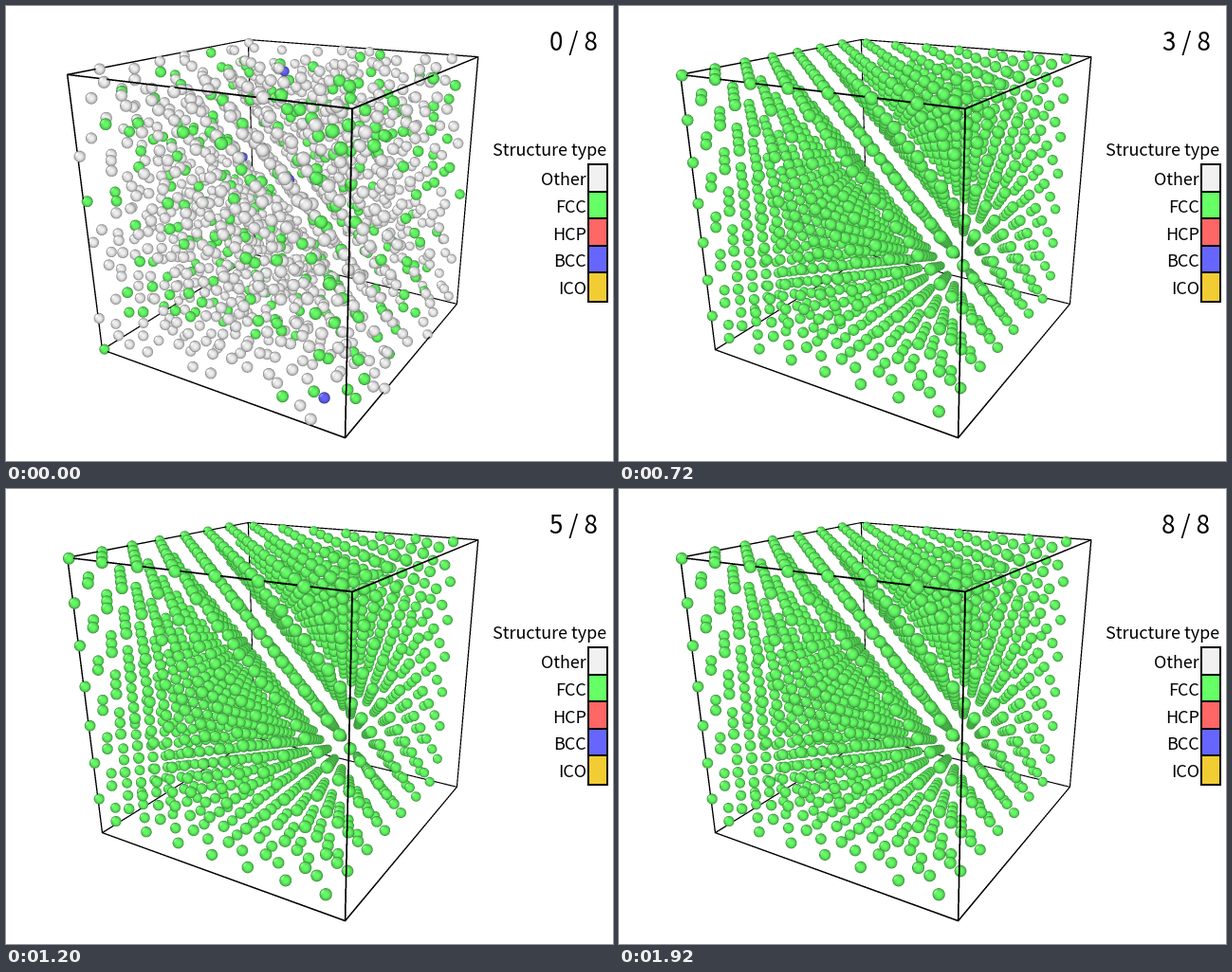
Write a matplotlib script that moves like this. It is 640 by 480 pixels and loops after 2.16 s.

```python
import itertools

import matplotlib.pyplot as plt
import numpy as np
from matplotlib.animation import FuncAnimation
from matplotlib.patches import Rectangle

W, H, DPI = 640, 480, 100
STEPS, INTERVAL = 9, 240
SS = 3                # supersampling
CELLS = 7             # unit cells along each box edge
RADIUS = 6.35         # sphere radius in px at depth 1
BULGE = 0.0083        # the same radius measured in depth
EDGE = 0.78           # half width of a box edge at depth 1
FONT = "Noto Sans CJK JP"

OTHER, FCC, HCP, BCC, ICO = range(5)
NAMES = ["Other", "FCC", "HCP", "BCC", "ICO"]
COLORS = np.array([[0.945, 0.945, 0.945], [0.4, 1, 0.4], [1, 0.4, 0.4],
                   [0.4, 0.4, 1], [0.95, 0.8, 0.2]])

# Visible box corners on screen, keyed by (x, y, z) in box fractions
CORNERS = {(0, 0, 0): (64, 72), (0, 0, 1): (101, 362),
           (0, 1, 0): (255, 35), (1, 0, 0): (365, 108),
           (1, 0, 1): (357, 455), (1, 1, 0): (497, 53),
           (1, 1, 1): (475, 314)}

# Screen spots of the few BCC atoms in the disordered steps
BCC_SPOTS = {0: [(295, 70), (252, 161), (298, 183), (331, 412)],
             1: [(158, 100), (117, 213), (102, 232), (137, 241), (230, 260),
                 (262, 137)]}


def solve_camera():
    """Least-squares projection that sends the unit cube to CORNERS."""
    rows, rhs = [], []
    for corner, (u, v) in CORNERS.items():
        q, p = np.array(corner, float), (*corner, 1)
        rows += [[*p, 0, 0, 0, 0, *(-u * q)], [0, 0, 0, 0, *p, *(-v * q)]]
        rhs += [u, v]
    sol = np.linalg.lstsq(np.array(rows), np.array(rhs), rcond=None)[0]
    return np.append(sol, 1).reshape(3, 4)


CAMERA = solve_camera()


def project(p):
    """Screen x, y and depth of points in box fractions."""
    q = p @ CAMERA[:, :3].T + CAMERA[:, 3]
    return q[:, 0] / q[:, 2] + 0.5, q[:, 1] / q[:, 2] + 0.5, q[:, 2]


rng = np.random.default_rng(7)
basis = np.array([(0, 0, 0), (0.5, 0.5, 0), (0.5, 0, 0.5), (0, 0.5, 0.5)])
cells = np.array(list(itertools.product(range(CELLS), repeat=3)))
SITES = (cells[:, None] + basis).reshape(-1, 3)
NOISE = rng.normal(size=SITES.shape)
DICE = rng.random(len(SITES))


def positions(step):
    """Atoms relax onto the lattice; those leaving the box wrap around."""
    drift = 0.02 + np.array([0.02, 0.005, -0.005]) * 0.6 ** step
    p = SITES + drift + NOISE * (0.001 + 0.06 * 0.25 ** step)
    dy = SITES[:, 1] - 4.3
    dz = (SITES[:, 2] - 6.75 + CELLS / 2) % CELLS - CELLS / 2
    dip = np.exp(-(dy / 2.3) ** 2 - (dz / 0.8) ** 2)
    p[:, 0] -= 0.16 * 0.5 ** step * dip
    return p % CELLS / CELLS


def structure(step, x, y):
    def bump(cx, cy, sx, sy):
        return np.exp(-((x - cx) / sx) ** 2 - ((y - cy) / sy) ** 2)

    kinds = np.full(len(x), FCC)
    if step == 0:
        kinds[DICE > 0.2 + 0.3 * bump(400, 130, 60, 60)] = OTHER
    elif step == 1:
        odds = 0.16 * bump(190, 215, 50, 75) + 0.3 * bump(440, 200, 20, 25)
        kinds[DICE < 0.004 + odds] = OTHER
    for sx, sy in BCC_SPOTS.get(step, []):
        kinds[np.argmin(np.hypot(x - sx, y - sy))] = BCC
    return kinds


def draw_box():
    """White canvas with the black box edges, plus its depth buffer."""
    img = np.ones((H * SS, W * SS, 3))
    zbuf = np.full((H * SS, W * SS), np.inf)
    corners = np.array(list(itertools.product((0.0, 1.0), repeat=3)))
    edges = [(a, b) for a, b in itertools.combinations(corners, 2)
             if np.abs(a - b).sum() == 1]
    edges.sort(key=lambda e: -project(np.array(e))[2].mean())
    t = np.linspace(0, 1, 2500)[:, None]
    for a, b in edges:
        x, y, depth = project(a + (b - a) * t)
        x, y, r = x * SS, y * SS, EDGE / depth * SS
        for dx, dy in itertools.product(range(-4, 5), repeat=2):
            col, row = (x + dx).astype(int), (y + dy).astype(int)
            ok = np.hypot(col + 0.5 - x, row + 0.5 - y) <= r
            img[row[ok], col[ok]] = 0
            zbuf[row[ok], col[ok]] = depth[ok]
    return img, zbuf


LIGHT = np.array([-1.8, 1.5, -0.2]) / np.linalg.norm([-1.8, 1.5, -0.2])


def draw_sphere(img, zbuf, x, y, depth, color):
    x, y, r = x * SS, y * SS, RADIUS / depth * SS
    left, top, size = int(x - r), int(y - r), int(2 * r) + 3
    nx = (np.arange(left, left + size) + 0.5 - x) / r
    ny = -(np.arange(top, top + size)[:, None] + 0.5 - y) / r
    d2 = nx ** 2 + ny ** 2
    nz = np.sqrt(np.maximum(1 - d2, 0))
    area = slice(top, top + size), slice(left, left + size)
    z = depth - BULGE * nz
    seen = (d2 < 1) & (z < zbuf[area])
    mirror = 2 * nz * (LIGHT[0] * nx + LIGHT[1] * ny + LIGHT[2] * nz) - LIGHT[2]
    glint = 0.25 * np.maximum(mirror, 0) ** 6
    shade = (0.4 + 0.6 * nz)[..., None] * color + glint[..., None]
    img[area][seen] = np.minimum(shade[seen], 1)
    zbuf[area][seen] = z[seen]


BOX_IMG, BOX_Z = draw_box()


def render(step):
    img, zbuf = BOX_IMG.copy(), BOX_Z.copy()
    x, y, depth = project(positions(step))
    for atom in zip(x, y, depth, COLORS[structure(step, x, y)]):
        draw_sphere(img, zbuf, *atom)
    small = img.reshape(H, SS, W, SS, 3).mean(axis=(1, 3))
    return (small * 255 + 0.5).astype(np.uint8)


def px(n):
    return n * 72 / DPI


PICTURES = [render(k) for k in range(STEPS)]

fig = plt.figure(figsize=(W / DPI, H / DPI), dpi=DPI, facecolor="white")
ax = fig.add_axes([0, 0, 1, 1])
ax.axis("off")
view = ax.imshow(PICTURES[0], extent=(0, W, H, 0), aspect="auto",
                 interpolation="nearest")
ax.set_xlim(0, W)
ax.set_ylim(H, 0)


def label(x, y, text, size, ha):
    return ax.text(x, y, text, fontsize=px(size), family=FONT, color="black",
                   ha=ha, va="baseline")


label(633, 158, "Structure type", 18, "right")
for i, name in enumerate(NAMES):
    label(612, 189.2 + 28.75 * i, name, 18, "right")
    # each swatch covers the lower rest of the column
    top = 167 + 28.6 * i
    ax.add_patch(Rectangle((614, top), 20, 312 - top, fc=COLORS[i],
                           ec="black", lw=px(2)))
counter = label(598, 46.5, "", 26, "center")


def update(step):
    view.set_data(PICTURES[step])
    counter.set_text(f"{step} / {STEPS - 1}")
    return view, counter


anim = FuncAnimation(fig, update, frames=STEPS, interval=INTERVAL,
                     repeat=True, repeat_delay=0)
plt.show()
```
